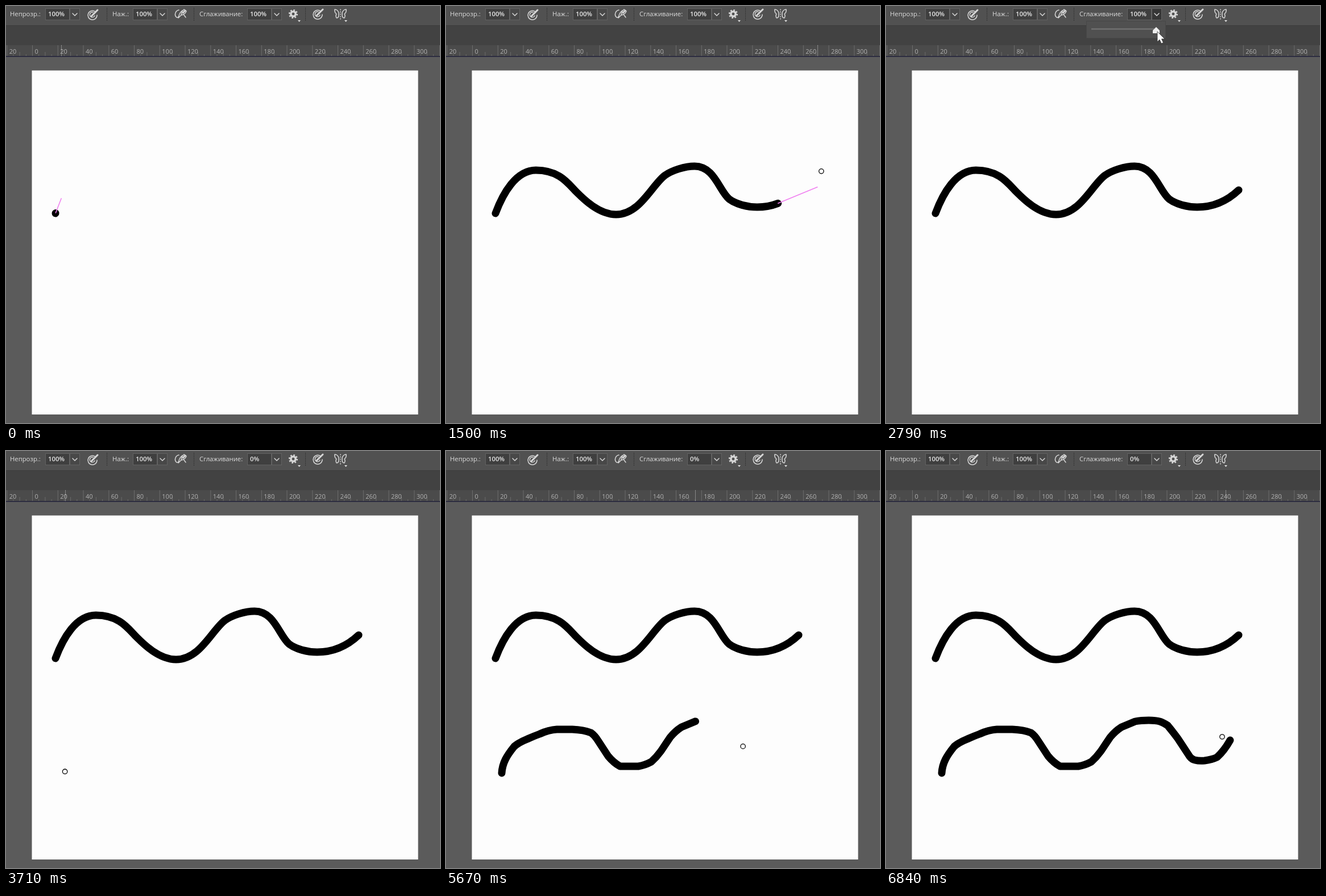
Recreate the animation shown at these times as an HTML page. Size 763 by 734 pixels, loop 6890 ms.

```html
<!DOCTYPE html>
<html lang="ru">
<head>
<meta charset="utf-8">
<style>
  html, body { margin: 0; width: 100%; height: 100%; overflow: hidden; background: #5b5b5b; }
  svg { display: block; width: 763px; height: 734px; }
  text { font-family: "Open Sans", "Noto Sans", sans-serif; fill: #dcdcdc; font-size: 11.3px; }
  .value { font-weight: 600; fill: #e6e6e6; }
  #ruler text { font-size: 11px; fill: #b2b2b2; }
  .ink { fill: none; stroke: #000; stroke-width: 13; stroke-linecap: round; stroke-linejoin: round; }
  .icon { fill: none; stroke: #d6d6d6; stroke-width: 1.5; stroke-linecap: round; stroke-linejoin: round; }
</style>
</head>
<body>
<svg viewBox="0 0 763 734">
  <rect width="763" height="734" fill="#5b5b5b"/>
  <rect width="763" height="34" fill="#515151"/>
  <rect y="34" width="763" height="35" fill="#424242"/>
  <path d="M0 34.5H763" stroke="#393939"/>
  <rect y="69" width="763" height="19" fill="#4b4b4b"/>
  <g id="ruler"></g>
  <path d="M0 88.7H763" stroke="#20203a" stroke-width="1.5"/>
  <path id="marker" d="M0 69V88" stroke="#c4c4c4" stroke-dasharray="1 1"/>

  <path d="M177.5 3V27M330.5 3V27M526.5 3V27" stroke="#333" stroke-dasharray="2 1"/>
  <text x="7" y="18">Непрозр.:</text>
  <text x="187" y="18">Наж.:</text>
  <text x="340" y="18">Сглаживание:</text>
  <g id="fields"></g>

  <defs>
    <g id="pressure" class="icon">
      <path d="M5 -5A8 8 0 1 0 8 1M1 -4A4.5 4.5 0 1 0 4 2"/>
      <path d="M-2 3L9 -8" stroke-width="3"/>
    </g>
  </defs>
  <use href="#pressure" x="152" y="15"/>
  <use href="#pressure" x="548" y="14"/>
  <g class="icon" transform="translate(307 14)">
    <path d="M-3 -7C-9 -6 -12 2 -7 6Q-4 7 -3 3Q-2 -2 3 -6M-4 7L1 2Q1 -4 6 -8L10 -5Q8 1 1 2M6 2L9 6"/>
    <path d="M4 -2L8 -6" stroke-width="3"/>
  </g>
  <g class="icon" transform="translate(505 14)">
    <circle r="4.2" stroke-width="3.5"/>
    <circle r="6.8" stroke-width="2.6" stroke-linecap="butt" stroke-dasharray="2.67 2.67"/>
  </g>
  <g class="icon" transform="translate(588 14)">
    <path d="M0 -8V9" stroke-dasharray="1 3"/>
    <path id="wing" d="M3 -2Q5 -8 10 -8Q11 -3 7 0Q9 3 7 7Q3 7 3 2Z"/>
    <use href="#wing" transform="scale(-1 1)"/>
  </g>
  <path d="M513 25h5l-2.5 3zM595 25h5l-2.5 3z" fill="#e4e4e4"/>

  <rect x="45.5" y="113.5" width="679" height="605.5" fill="#fdfdfd"/>
  <path id="smooth" class="ink" d="M87 365C100 330 123 289 158 289C200 289 215 313 230 328C242 340 269 367 299 367C341 367 362 315 385 298C398 289 420 282 437 282C472 282 480 325 498 340C510 349 530 354 547 354C578 354 602 341 620 324"/>
  <path id="rough" class="ink" d="M98 567C99 549 107 536 120 520Q128 513 143 507Q154 502 165 498Q180 491 195 490H222Q243 491 255 496Q262 501 268 511L285 537Q295 549 306 555H338Q350 553 361 547Q370 539 378 528L394 504Q403 493 414 486L438 476Q448 474 462 474C480 474 486 477 495 483Q505 495 513 506L534 538Q538 543 543 544Q551 546 560 545Q574 543 582 539Q595 527 605 509"/>
  <path id="leash" stroke="#f07ef0" stroke-width="1.5"/>

  <g id="popup">
    <rect x="352.5" y="26.5" width="139" height="30" fill="#505050" stroke="#474747"/>
    <path d="M361 40.5H473" stroke="#777" stroke-width="2"/>
    <path id="thumb" d="M0 37L6 43V48H-6V43Z" fill="#eee"/>
  </g>
  <circle id="brush" r="4.2" fill="none" stroke="#000" stroke-width="1.3"/>
  <path id="arrow" d="M0 0V18L4 14.3L7 21L10.5 19.5L7.5 13H13Z" fill="#fff" stroke="#333" stroke-width=".8"/>
</svg>
<script>
const LOOP = 6890;
const LEAD = 190; // how far the pointer runs ahead of the leash, ms
const $ = id => document.getElementById(id);
const show = (el, on) => el.setAttribute('visibility', on ? 'visible' : 'hidden');
const place = (el, x, y) => el.setAttribute('transform', `translate(${x} ${y})`);

// Piecewise linear track; each key is [time, value, ...]
function track(keys, t, column = 1) {
  if (t <= keys[0][0]) return keys[0][column];
  for (let i = 1; i < keys.length; i++) {
    const a = keys[i - 1], b = keys[i];
    if (t <= b[0]) return a[column] + (b[column] - a[column]) * (t - a[0]) / (b[0] - a[0]);
  }
  return keys[keys.length - 1][column];
}

function buildRuler() {
  const unit = 678 / 303;
  let ticks = '', labels = '';
  for (let v = -20; v <= 320; v += 5) {
    const x = 46.5 + v * unit;
    const top = v % 20 === 0 ? 69 : v % 10 === 0 ? 81 : 85;
    ticks += `M${x.toFixed(1)} ${top}V88`;
    if (v % 20 === 0) labels += `<text x="${(x + 4).toFixed(1)}" y="84">${Math.abs(v)}</text>`;
  }
  $('ruler').innerHTML = `<path d="${ticks}" stroke="#6c6c6c"/>` + labels;
}

function buildFields() {
  $('fields').innerHTML = [69, 223, 424].map(x => `
    <rect x="${x + .5}" y="4.5" width="42" height="20" fill="#3f3f3f" stroke="#626262"/>
    <rect class="drop" x="${x + 43.5}" y="4.5" width="17" height="20" fill="#484848" stroke="#626262"/>
    <path d="M${x + 48} 13l4 4l4 -4" class="icon" stroke-width="1.2"/>
    <text class="value" x="${x + 5}" y="18">100%</text>`).join('');
}

buildRuler();
buildFields();
const drop = document.querySelectorAll('.drop')[2];
const value = document.querySelectorAll('.value')[2];

function lengthAtX(path, x) {
  let lo = 0, hi = path.getTotalLength();
  for (let i = 0; i < 24; i++) {
    const mid = (lo + hi) / 2;
    if (path.getPointAtLength(mid).x < x) lo = mid; else hi = mid;
  }
  return hi;
}
const along = (path, keys) => keys.map(([t, x]) => [t, lengthAtX(path, x)]);

const smooth = $('smooth'), rough = $('rough');
const smoothKeys = along(smooth, [[0, 87], [790, 337], [1500, 583], [1750, 620]]);
const roughKeys = along(rough, [[4640, 98], [4710, 109], [5670, 438], [6350, 605]]);
const aheadKeys = along(rough, [[4500, 98], [4710, 225], [5670, 522], [6150, 605]]);
const leashKeys = [[0, 28], [160, 79], [1500, 76], [1750, 58]];
const travelKeys = [
  [2230, 658, 284], [2530, 477, 17], [2640, 477, 17], [2730, 477, 45], [2860, 477, 45],
  [3220, 363, 45], [3360, 363, 47], [3680, 104, 564], [4150, 98, 567]
];
const settleKeys = [[6150, 605, 509], [6400, 608, 500], [6800, 591, 503]];

// The leash pulls along the direction the stroke is about to take
function leashEnd(t) {
  const length = track(smoothKeys, t);
  const tip = smooth.getPointAtLength(length);
  const a = smooth.getPointAtLength(Math.max(0, length - 2));
  const b = smooth.getPointAtLength(length + 8);
  const scale = track(leashKeys, t) / (Math.hypot(b.x - a.x, b.y - a.y) || 1);
  return { x: tip.x + (b.x - a.x) * scale, y: tip.y + (b.y - a.y) * scale, tip };
}

function pointer(t) {
  if (t < 2000) return leashEnd(t + LEAD);
  if (t < 2230) {
    const end = leashEnd(1750), k = (t - 2000) / 230;
    return { x: end.x + (658 - end.x) * k, y: end.y + (284 - end.y) * k };
  }
  if (t < 4500) return { x: track(travelKeys, t), y: track(travelKeys, t, 2) };
  if (t < 6150) return rough.getPointAtLength(track(aheadKeys, t));
  return { x: track(settleKeys, t), y: track(settleKeys, t, 2) };
}

function markerX(t, cursor) {
  if (t < 1800) return leashEnd(t).x;
  if (t < 4500) return cursor.x;
  if (t < 6350) return rough.getPointAtLength(track(roughKeys, t)).x;
  return track([[6350, 605], [6800, 597]], t);
}

function draw(t) {
  smooth.setAttribute('stroke-dasharray', `${Math.max(.01, track(smoothKeys, t))} 2000`);
  rough.setAttribute('stroke-dasharray', `${Math.max(.01, track(roughKeys, t))} 2000`);
  show(rough, t >= 4620);

  const end = leashEnd(t);
  $('leash').setAttribute('d', `M${end.tip.x} ${end.tip.y}L${end.x} ${end.y}`);
  show($('leash'), t < 1780);

  const cursor = pointer(t), overCanvas = cursor.y > 89;
  show($('brush'), overCanvas && t >= 40);
  show($('arrow'), !overCanvas);
  place($('brush'), cursor.x, cursor.y);
  place($('arrow'), cursor.x, cursor.y);
  show($('marker'), overCanvas);
  place($('marker'), Math.round(markerX(t, cursor)) + .5, 0);

  const open = t >= 2600 && t < 3370;
  const level = track([[2860, 1], [3220, 0]], t);
  show($('popup'), open);
  place($('thumb'), 361 + 114 * level, 0);
  drop.setAttribute('fill', open ? '#363636' : '#484848');
  value.textContent = Math.round(level * 100) + '%';
}

const start = performance.now();
function frame() {
  draw((performance.now() - start) % LOOP);
  requestAnimationFrame(frame);
}
frame();
</script>
</body>
</html>
```
